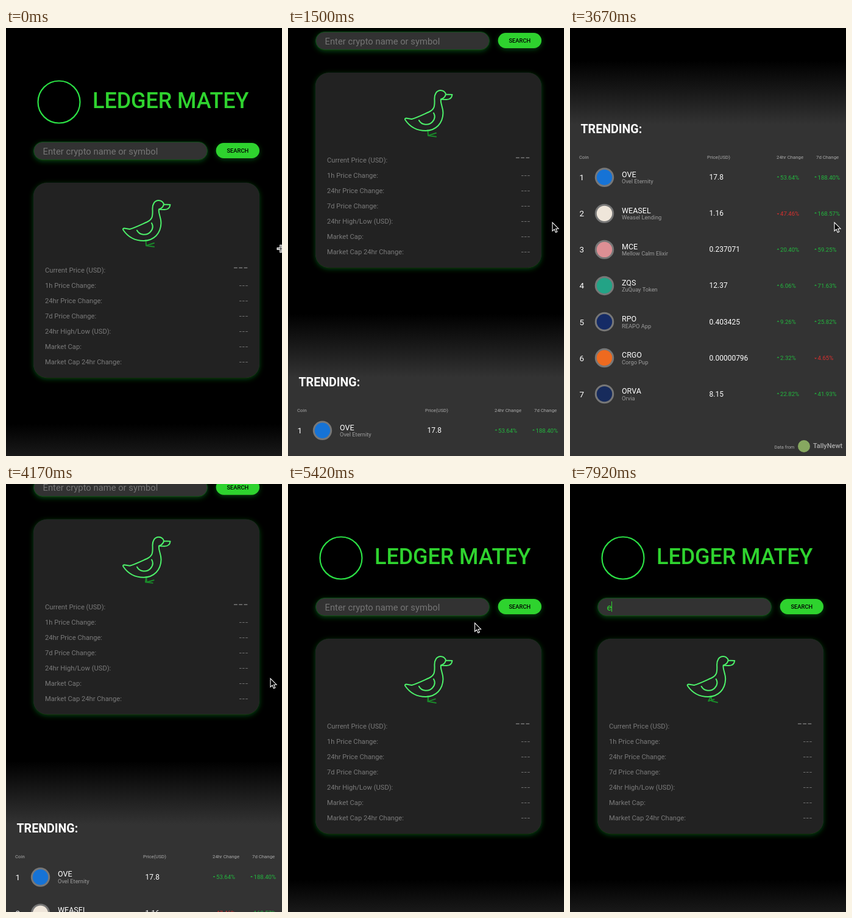
Recreate the animation shown at these times as an HTML page. Size 453 by 700 pixels, loop 8 s.

```html
<!DOCTYPE html>
<html lang="en">
<head>
<meta charset="utf-8">
<title>Coin prices</title>
<style>
html, body { margin: 0; width: 100%; height: 100%; overflow: hidden; background: #fff; }
svg { display: block; width: 100vw; height: 100vh; font-family: Roboto, sans-serif; }
</style>
</head>
<body>
<svg id="stage" viewBox="0 0 453 700">
  <defs>
    <linearGradient id="fade" gradientUnits="userSpaceOnUse" x1="0" y1="648" x2="0" y2="752">
      <stop offset="0" stop-color="#000"/><stop offset="1" stop-color="#333"/>
    </linearGradient>
    <filter id="glow" x="-20%" y="-80%" width="140%" height="260%">
      <feDropShadow dx="0" dy="2" stdDeviation="4.5" flood-color="#0a8a1a" flood-opacity=".5"/>
    </filter>
  </defs>
  <g id="page">
    <rect width="453" height="1400" fill="url(#fade)"/>
    <circle cx="87" cy="121" r="34.5" fill="none" stroke="#2be045" stroke-width="2.2"/>
    <text x="142" y="131" font-size="36" font-weight="500" letter-spacing="-.1" fill="#2fd32f">LEDGER MATEY</text>

    <rect x="45.5" y="186.5" width="285" height="29" rx="14.5" fill="#333" stroke="#0b4f14" filter="url(#glow)"/>
    <text id="hint" x="60.5" y="206.5" font-size="14.8" fill="#757575">Enter crypto name or symbol</text>
    <text id="typed" x="60.5" y="206.5" font-size="14.8" fill="#2fd32f">e</text>
    <rect id="caret" y="192" width="1" height="17" fill="#2fd32f"/>
    <rect x="344.7" y="188" width="71.3" height="25" rx="12.5" fill="#2fd32f" filter="url(#glow)"/>
    <text x="380.3" y="204.3" font-size="9.4" font-weight="500" text-anchor="middle">SEARCH</text>

    <rect x="45" y="253" width="371" height="319" rx="22" fill="#242424" filter="url(#glow)"/>
    <g fill="none" stroke-width="2" stroke-linecap="round" stroke-linejoin="round">
      <path id="legs" stroke="#1a8a2a"/>
      <path id="duck" stroke="#4df06a" d="M194 327.5 L203 329 C211 327 221 322 231 317.5 C240 313 241 309 240.5 297 C240 288 244 282 250.5 282
        C255 282 258.5 285 259 288.5 L269.5 289 C269 294 266 297 260 297 L251 296.5 C249.5 303 254.5 309 254.5 319 C254 336 243 347.5 226 348
        C210 348 199 340 192.5 330.5 Q191 328 194 327.5 M259 288.5 Q257.5 294.5 251 296.5 M215 331 C219 339 231 340 237 333.5 C241 329 242 324 239 319"/>
    </g>
    <g id="stats"></g>

    <text x="17.5" y="765.5" font-size="19.6" font-weight="600" fill="#fff">TRENDING:</text>
    <g id="table"></g>
    <text x="335.5" y="1281.5" font-size="7.4" fill="#aaa">Data from</text>
    <circle cx="384" cy="1278" r="10" fill="#87a860"/>
    <text x="399" y="1281" font-size="11" font-weight="500" fill="#aaa">TallyNewt</text>
  </g>
  <path id="arrow" d="M0 0V14L3.2 11.2 5.4 16.2 7.8 15.2 5.6 10.2H10Z" fill="#000" stroke="#fff" stroke-width="1.1"/>
  <g id="cross" transform="translate(451 361)" fill="none">
    <path d="M-6.5 0H6.5M0 -6.5V6.5" stroke="#fff" stroke-width="3.8"/>
    <path d="M-5.5 0H5.5M0 -5.5V5.5" stroke="#222" stroke-width="1.2"/>
  </g>
</svg>
<script>
const LOOP = 8000, FPS = 12;
const GREEN = '#23b83f', RED = '#d8302f', GREY = '#7a7a7a';
const el = id => document.getElementById(id);
const label = (x, y, size, fill, str, extra = '') =>
  `<text x="${x}" y="${y}" font-size="${size}" fill="${fill}" ${extra}>${str}</text>`;

// Price card
el('stats').innerHTML = ['Current Price (USD)', '1h Price Change', '24hr Price Change', '7d Price Change',
  '24hr High/Low (USD)', 'Market Cap', 'Market Cap 24hr Change'].map((name, i) => {
  const y = 400 + 25 * i;
  return label(64, y, 11.2, GREY, name + ':') +
    label(397.5, i ? y - .2 : 398.4, i ? 11 : 18, GREY, '---', 'text-anchor="end" font-family="Inter, sans-serif"');
}).join('');

// Trending list: symbol, name, price, 24hr, 7d, icon colour
const coins = [
  ['OVE', 'Ovel Eternity', '17.8', 53.64, 188.4, '#1673d6'],
  ['WEASEL', 'Weasel Lending', '1.16', -47.46, 168.57, '#efe6da'],
  ['MCE', 'Mellow Calm Elixir', '0.237071', 20.4, 59.25, '#dd8f94'],
  ['ZQS', 'ZuQuay Token', '12.37', 6.06, 71.63, '#23a386'],
  ['RPO', 'REAPO App', '0.403425', 9.26, 25.82, '#152b66'],
  ['CRGO', 'Corgo Pup', '0.00000796', 2.32, -4.65, '#ee6a1f'],
  ['ORVA', 'Orvia', '8.15', 22.82, 41.93, '#172b5c']
];

function change(x, y, v) {
  const fill = v < 0 ? RED : GREEN, d = v < 0 ? 2 : -2;
  return `<path d="M${x} ${y - 3.2}h4l-2 ${d}z" fill="${fill}"/>` +
    label(x + 5.5, y, 9.6, fill, Math.abs(v).toFixed(2) + '%');
}

const heads = [[15, 'Coin'], [225, 'Price(USD)'], [339, '24hr Change'], [404, '7d Change']];
el('table').innerHTML = heads.map(([x, s]) => label(x, 807.6, 7.8, '#aaa', s)).join('') +
  coins.map(([sym, name, price, day, week, color], i) => {
    const y = 838.3 + 59.05 * i;
    return label(15.5, y + 5, 13.5, '#fff', i + 1) +
      `<circle cx="56.5" cy="${y}" r="14.2" fill="${color}" stroke="#777" stroke-width="3"/>` +
      label(85, y - .8, 12.5, '#fff', sym) +
      label(85, y + 10, 9.3, '#9c9c9c', name) +
      label(228.5, y + 4, 12, '#fff', price) +
      change(339.5, y + 3.2, day) + change(401, y + 3.2, week);
  }).join('');

// Monotone cubic through [time, value] keys
function curve(keys) {
  const slope = i => (keys[i + 1][1] - keys[i][1]) / (keys[i + 1][0] - keys[i][0]);
  const tangent = i => {
    if (i === 0 || i === keys.length - 1) return 0;
    const a = slope(i - 1), b = slope(i);
    return a * b > 0 ? 2 * a * b / (a + b) : 0;
  };
  return t => {
    if (t <= keys[0][0]) return keys[0][1];
    const i = keys.findIndex(k => k[0] > t) - 1;
    if (i < 0) return keys[keys.length - 1][1];
    const [t0, v0] = keys[i], [t1, v1] = keys[i + 1];
    const h = t1 - t0, u = (t - t0) / h, w = 1 - u;
    return v0 * w * w * (1 + 2 * u) + v1 * u * u * (1 + 2 * w) +
      h * u * w * (tangent(i) * w - tangent(i + 1) * u);
  };
}

const scrollY = curve([[420, 0], [833, 42], [1500, 180], [2583, 474], [3200, 594], [3680, 594],
  [4000, 400], [4340, 0], [4450, -42], [4667, -19], [5000, -1.5], [5170, 0]]);
const mouseX = curve([[150, 451], [420, 434], [4700, 434], [5000, 392], [5700, 275]]);
const mouseY = curve([[150, 361], [420, 318], [4700, 318], [5000, 290], [5700, 203.5]]);

const STRIDE = 600, FOCUS = 6830, TYPE = 7740;
const show = (id, on) => el(id).setAttribute('visibility', on ? 'visible' : 'hidden');

function leg(phase) {
  const s = Math.sin(phase * 2 * Math.PI), c = Math.cos(phase * 2 * Math.PI);
  const x = 230 + 3 * s, y = 356 - Math.abs(s);
  return `M${229.5 + 2 * Math.abs(s)} 347L${x} ${y}L${x + 13 - 4 * Math.abs(s)} ${354.8 + 3 * c + 1.5 * s}`;
}

function draw(t) {
  el('page').setAttribute('transform', `translate(0 ${-scrollY(t)})`);

  const p = t / STRIDE;
  el('legs').setAttribute('d', leg(p) + leg(p + .5));
  el('duck').setAttribute('transform', `translate(${.4 * (1 - Math.cos(4 * Math.PI * p))} 0)`);

  el('arrow').setAttribute('transform', `translate(${mouseX(t)} ${mouseY(t)})`);
  show('cross', t < 160);
  show('arrow', t >= 160 && t < TYPE);

  const typed = t >= TYPE;
  show('hint', !typed);
  show('typed', typed);
  show('caret', typed || t >= FOCUS && (t - FOCUS) % 1000 < 500);
  el('caret').setAttribute('x', typed ? 68 : 60.5);
}

const start = performance.now();
function tick(now) {
  const t = Math.max(0, now - start) % LOOP;
  draw(Math.floor((t + 5) * FPS / 1000) * 1000 / FPS % LOOP);
  requestAnimationFrame(tick);
}
draw(0);
requestAnimationFrame(tick);
</script>
</body>
</html>
```
